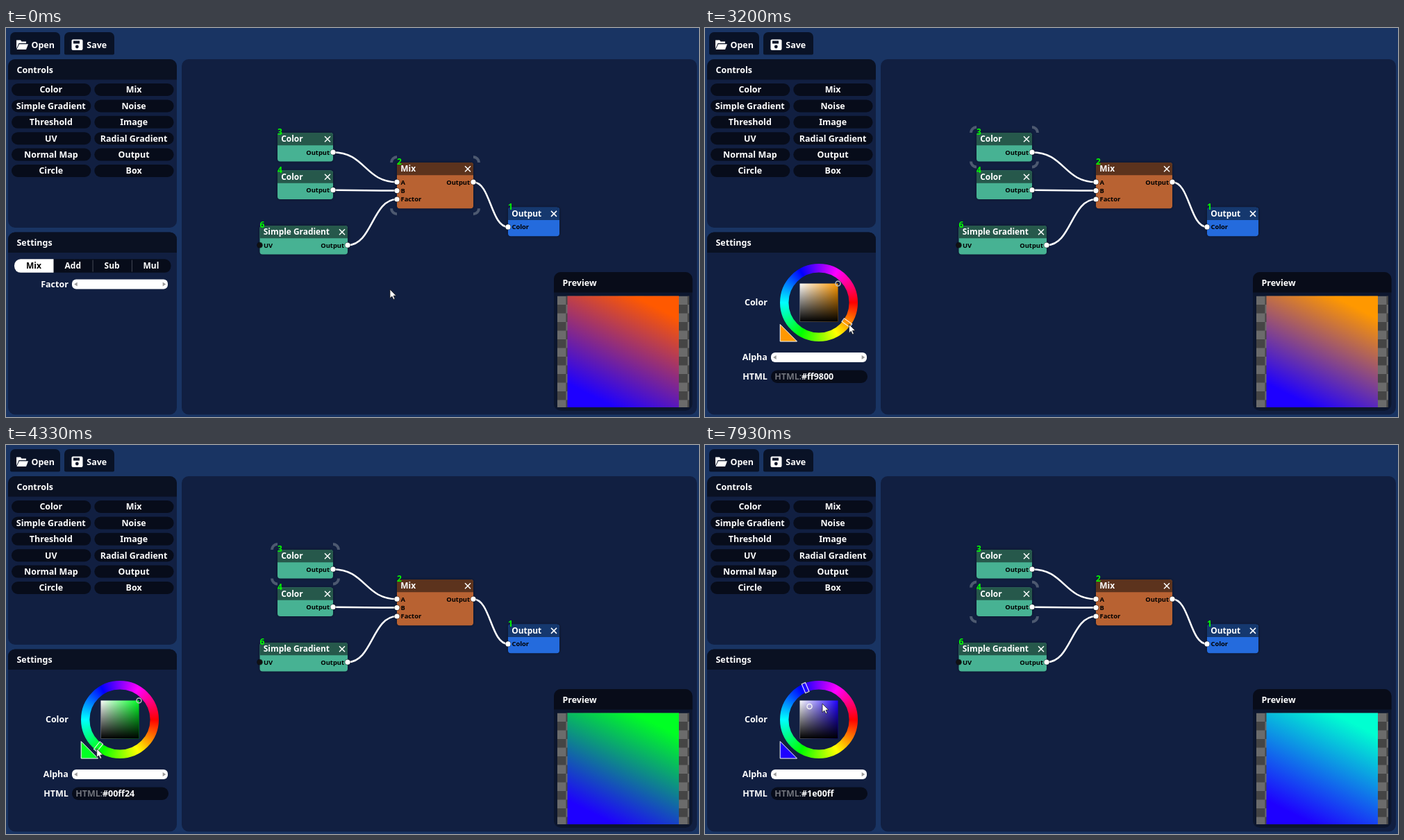
Animation, 998 px wide and 561 px high, one loop 8000 ms. Source, as an HTML page with a canvas:

```html
<!DOCTYPE html>
<html lang="en">
<head>
<meta charset="utf-8">
<title>Node editor</title>
<style>
  html, body { margin: 0; height: 100%; overflow: hidden; background: #193463; }
  canvas { display: block; }
</style>
</head>
<body>
<canvas id="stage" width="998" height="561"></canvas>
<script>
const ctx = document.getElementById('stage').getContext('2d');
const LOOP = 8000, STEP = 1000 / 15;
const PANEL = '#111f41', HEAD = '#0a1122', DARK = '#070c1a';
const WHEEL = { x: 164, y: 396, r: 49.8 };
const ORANGE = 20.94, BLUE = 247.06;
const PICK_FIRST = 1330, DRAG = 3195, DROP = 5860, PICK_SECOND = 7599;

// Pointer moves: start, end, x, y
const moves = [
  [533, 933, 391, 161], [1000, 1133, 408, 164], [1667, 2067, 145, 400],
  [2133, 2533, 205, 416], [5867, 6067, 150, 437], [6067, 6533, 373, 294],
  [6533, 6733, 390, 231], [6800, 7467, 438, 225], [7733, 7867, 148, 409],
  [7867, 7933, 169, 373]
];
// Hue drag: start, end, hue
const turns = [
  [3133, 3533, 64.71], [3533, 4333, 128.47], [4333, 4867, 159.29], [5000, 5200, 169.18]
];

const clamp = v => Math.max(0, Math.min(1, v));
const smooth = f => f * f * (3 - 2 * f);

// Runs value v through the finished and current steps
function follow(steps, t, v, ease) {
  for (const [start, end, ...goal] of steps) {
    const f = ease(clamp((t - start) / (end - start)));
    v = v.map((a, i) => a + (goal[i] - a) * f);
  }
  return v;
}

const hueAt = t => t < DRAG ? ORANGE : follow(turns, t, [30], f => f)[0];

function pointerAt(t) {
  if (t < DRAG || t > DROP) return follow(moves, t, [553, 377], smooth);
  const a = hueAt(t) * Math.PI / 180;
  return [WHEEL.x + 53.5 * Math.cos(a), WHEEL.y + 53.5 * Math.sin(a)];
}

function hex(hue) {
  const part = n => {
    const k = (n + hue / 60) % 6;
    return Math.round(255 * (1 - clamp(Math.min(k, 4 - k)))).toString(16).padStart(2, '0');
  };
  return '#' + part(5) + part(3) + part(1);
}

function box(x, y, w, h, r, fill) {
  ctx.beginPath();
  ctx.roundRect(x, y, w, h, r);
  ctx.fillStyle = fill;
  ctx.fill();
}

// y is the middle of the capitals; the tiny skew keeps fractional baselines
function text(str, x, y, size = 12.48, fill = '#fff', align = 'left') {
  ctx.save();
  ctx.transform(1, 2e-4, 0, 1, x, y + size * 0.357);
  ctx.font = `bold ${size}px "Noto Sans", "Open Sans", sans-serif`;
  ctx.textAlign = align;
  ctx.fillStyle = fill;
  ctx.fillText(str, 0, 0);
  ctx.restore();
}

function stroke(color, width) {
  ctx.strokeStyle = color;
  ctx.lineWidth = width;
  ctx.stroke();
}

function poly(points, fill, edge, width) {
  ctx.beginPath();
  for (let i = 0; i < points.length; i += 2) ctx.lineTo(points[i], points[i + 1]);
  ctx.closePath();
  ctx.fillStyle = fill;
  ctx.fill();
  if (edge) stroke(edge, width);
}

function circle(x, y, r, fill) {
  ctx.beginPath();
  ctx.arc(x, y, r, 0, 7);
  ctx.fillStyle = fill || '#0000';
  ctx.fill();
}

function fade(x0, y0, x1, y1, from, to) {
  const g = ctx.createLinearGradient(x0, y0, x1, y1);
  g.addColorStop(0, from);
  g.addColorStop(1, to);
  return g;
}

function panel(title, x, y, w, h, body = PANEL, head = HEAD) {
  box(x, y, w, h, 10, body);
  box(x, y, w, 29.5, [10, 10, 0, 0], head);
  text(title, x + 12.5, y + 15.1);
}

function toolbar() {
  ['Open', 'Save'].forEach((name, i) => {
    box(6 + i * 78, 6, 72, 32.5, [7, 7, 2, 2], '#091226');
    text(name, 36.5 + i * 79.8, 24.1);
  });
  poly([15, 30, 15, 17.5, 21, 17.5, 22.5, 19.5, 29, 19.5, 29, 22, 18.5, 22], '#fff');
  poly([19, 23.3, 32, 23.3, 29, 31, 15.5, 31], '#fff');
  box(94.5, 16.5, 16, 15.5, 2, '#fff');
  box(97, 18.5, 9, 4, 0, '#091226');
  circle(102.3, 27, 2.4, '#091226');
}

function controls() {
  panel('Controls', 3, 45, 243, 243);
  ['Color', 'Mix', 'Simple Gradient', 'Noise', 'Threshold', 'Image', 'UV',
   'Radial Gradient', 'Normal Map', 'Output', 'Circle', 'Box'].forEach((name, i) => {
    const x = 8 + i % 2 * 119.3, y = 89 + (i >> 1) * 23.4;
    box(x, y - 9, 114.3, 18, 9, DARK);
    text(name, x + 56.8, y, 12.48, '#fff', 'center');
  });
}

const label = (name, y) => text(name, 89.8, y, 12.48, '#fff', 'right');

function slider(name, y) {
  label(name, y);
  box(95, y - 7, 138, 14, 6, '#fff');
  for (const s of [-1, 1]) {
    const x = 164.2 + s * 66;
    poly([x, y, x - s * 4.5, y - 3, x - s * 4.5, y + 3], '#999');
  }
}

function mixSettings() {
  box(12, 333.3, 225.5, 19.5, 9, DARK);
  box(12, 333.3, 56.5, 19.5, [9, 0, 0, 9], '#fff');
  ['Mix', 'Add', 'Sub', 'Mul'].forEach((name, i) => {
    text(name, 40 + i * 56.3, 343, 12, i ? '#fff' : '#000', 'center');
    if (i > 1) box(12 + i * 56.3, 334.5, 1, 17, 0, '#454a57');
  });
  slider('Factor', 369.5);
}

function colorSettings(hue, edited) {
  const { x, y, r } = WHEEL, color = hex(hue);
  label('Color', y);

  const ring = ctx.createConicGradient(0, x, y);
  for (let i = 0; i <= 6; i++) ring.addColorStop(i / 6, hex(i * 60 % 360));
  circle(x, y, r);
  stroke(ring, 12.4);

  const left = x - 27.5, top = y - 27.5, side = 55;
  box(left, top, side, side, 0, fade(left, 0, left + side, 0, '#fff', color));
  box(left, top, side, side, 0, fade(0, top, 0, top + side, '#0000', '#000'));
  if (edited) circle(left + side, top, 3.5);
  else circle(left + 14, top + 8.5, 3.5);
  stroke(edited ? '#bbb' : '#f4f4f4', 1.5);

  ctx.save();
  ctx.translate(x, y);
  ctx.rotate(hue * Math.PI / 180);
  ctx.beginPath();
  ctx.rect(r - 7, -2.8, 14, 5.6);
  stroke('#ffffffd8', 1.2);
  ctx.restore();

  poly([108.2, 427.5, 108.2, 452, 132.5, 452], color, '#fff', 1);
  slider('Alpha', 475);
  label('HTML', 503);
  box(95, 493.5, 139, 18.5, 9, DARK);
  text('HTML:', 100.3, 503, 12.48, '#70737b');
  text(color, 139, 503);
}

const GREEN = ['#26584b', '#47b293'], BROWN = ['#5c331d', '#b86232'], AZURE = ['#15386e', '#246bdd'];
const nodes = {
  3: { name: 'Color', x: 391, y: 151, w: 80, tint: GREEN, to: [2, 0] },
  4: { name: 'Color', x: 391, y: 205.5, w: 80, tint: GREEN, to: [2, 1] },
  6: { name: 'Simple Gradient', x: 365.5, y: 285, w: 126.5, tint: GREEN, ins: ['UV'], to: [2, 2] },
  2: { name: 'Mix', x: 563, y: 194, w: 110, tint: BROWN, ins: ['A', 'B', 'Factor'], to: [1, 0] },
  1: { name: 'Output', x: 723, y: 258.7, w: 74, tint: AZURE, ins: ['Color'] }
};
const portY = (node, slot = 0) => node.y + 28.2 + slot * 12.4;

function link(node) {
  const goal = nodes[node.to[0]], x = node.x + node.w, mid = (x + goal.x) / 2;
  const y0 = portY(node), y1 = portY(goal, node.to[1]);
  ctx.beginPath();
  ctx.moveTo(x, y0);
  ctx.bezierCurveTo(mid, y0, mid, y1, goal.x, y1);
  stroke('#fff', 2.5);
}

function socket(x, y, fill) {
  circle(x, y, 4.4, '#0008');
  circle(x, y, 3.6, fill);
}

function drawNode(id, node, selected) {
  const { name, x, y, w, tint, ins = [], to } = node;
  const h = 29.1 + 12.4 * Math.max(1, ins.length), right = x + w;
  ctx.shadowColor = '#0006';
  ctx.shadowBlur = 4;
  box(x, y, w, h, 4, tint[1]);
  ctx.shadowColor = 'transparent';
  box(x, y, w, 18.3, [4, 4, 0, 0], tint[0]);
  text(name, x + 5.3, y + 9.2, 11.9);

  ctx.beginPath();
  for (const s of [-4, 4]) {
    ctx.moveTo(right - 12, y + 9.2 - s);
    ctx.lineTo(right - 4, y + 9.2 + s);
  }
  stroke('#fff', 1.5);

  ins.forEach((port, i) => {
    text(port, x + 5.5, portY(node, i), 9.36, '#000');
    socket(x, portY(node, i), port === 'UV' ? '#111' : '#fff');
  });
  if (to) {
    text('Output', right - 5, portY(node), 9.36, '#000', 'right');
    socket(right, portY(node), '#fff');
  }

  if (selected)
    [[x, y], [right, y], [right, y + h], [x, y + h]].forEach(([px, py], i) => {
      ctx.beginPath();
      ctx.arc(px, py, 8, Math.PI * (1 + i / 2), Math.PI * (1.5 + i / 2));
      stroke('#4d5970', 4);
    });
  text(id, x, y - 1, 12, '#0f0');
}

function graph(active) {
  box(253, 45, 742, 512.5, 10, PANEL);
  for (const node of Object.values(nodes)) if (node.to) link(node);
  for (const id in nodes) drawNode(id, nodes[id], +id === active);
}

function preview(hue) {
  const x = 794, y = 386.5, w = 190, h = 160.5, cell = 12.5;
  panel('Preview', 789, 352, 199.5, 200, '#0c162e', '#080c19');
  ctx.save();
  ctx.beginPath();
  ctx.rect(x, y, w, h);
  ctx.clip();
  box(x, y, w, h, 0, '#6b6b6b');
  for (let r = 0; r < 13; r++)
    for (let c = (r + 1) % 2; c < 16; c += 2)
      box(x + c * cell, y + r * cell, cell, cell, 0, '#454545');
  ctx.restore();
  box(808.5, y, 160.5, h, 0, fade(758, 487, 828, 348, hex(BLUE), hex(hue)));
}

function cursor(x, y) {
  const shape = [0, 0, 0, 12.6, 2.9, 10, 5, 14.5, 7, 13.6, 5, 9.2, 8.8, 9];
  poly(shape.map((v, i) => v + (i % 2 ? y : x)), '#fff', '#1c1c1c', 0.8);
}

function draw(t) {
  const active = t < PICK_FIRST ? 2 : t < PICK_SECOND ? 3 : 4;
  const hue = hueAt(t);
  ctx.fillStyle = '#193463';
  ctx.fillRect(0, 0, 998, 561);
  toolbar();
  controls();
  panel('Settings', 3, 294.5, 243, 263);
  if (active === 2) mixSettings();
  else if (active === 3) colorSettings(hue, t > DRAG);
  else colorSettings(BLUE, false);
  graph(active);
  preview(hue);
  cursor(...pointerAt(t));
}

// The screen updates 15 times a second
function tick() {
  const t = performance.now() % LOOP;
  draw(Math.floor((t + 4) / STEP) * STEP % LOOP);
  requestAnimationFrame(tick);
}
tick();
</script>
</body>
</html>
```
